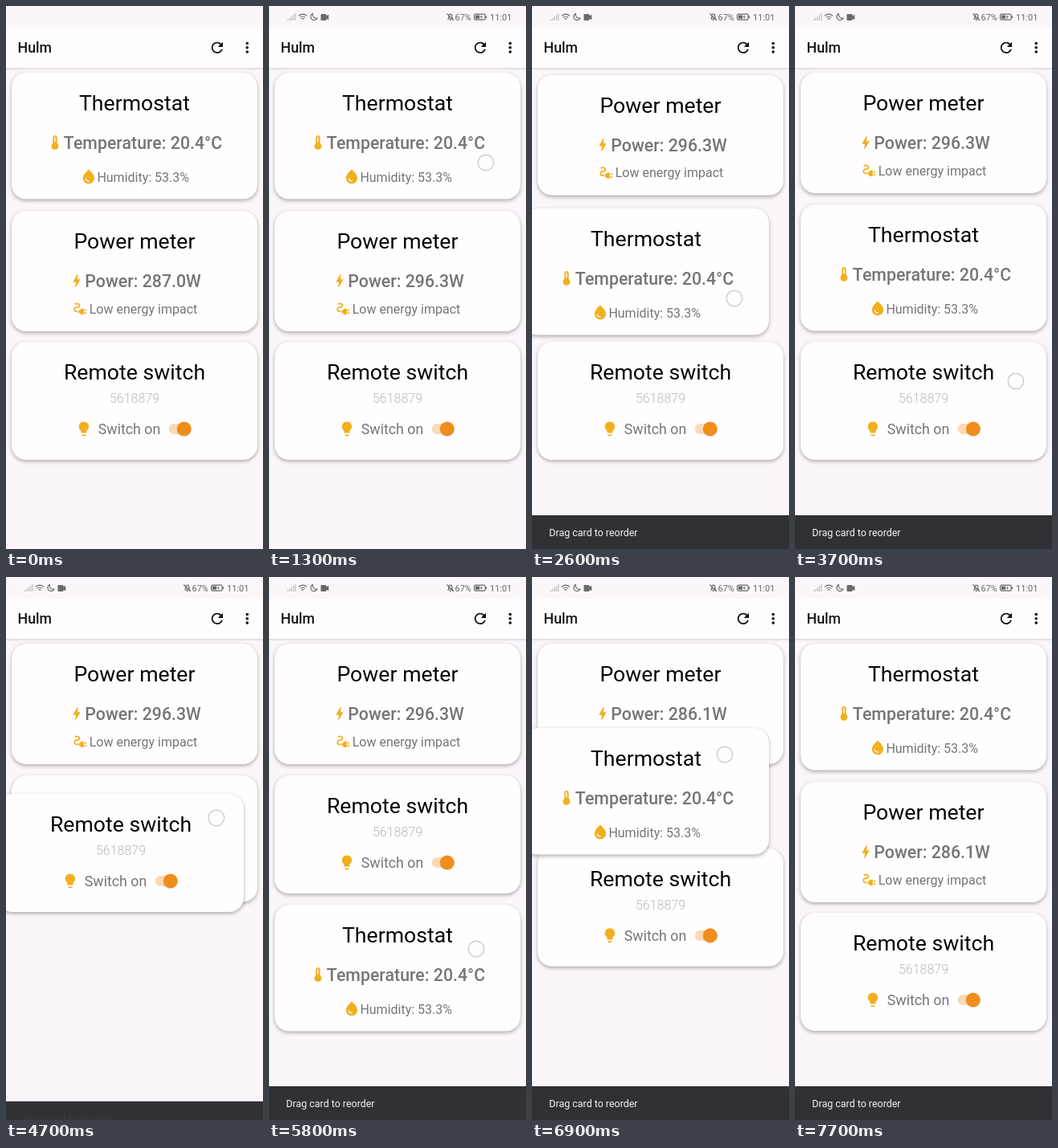
An HTML page that plays this animation: 320x676 px, repeating every 8000 ms.

```html
<!DOCTYPE html>
<html lang="en">
<head>
<meta charset="utf-8">
<title>Card reordering</title>
<style>
html, body { margin: 0; width: 100%; height: 100%; overflow: hidden; background: #faf6f9; }
svg { display: block; width: 100%; height: 100%; }
text { font-family: Roboto, "Noto Sans", sans-serif; }
.mid { text-anchor: middle; }
.title { font-size: 26.67px; fill: #050505; }
.value { font-size: 21.33px; font-weight: 500; fill: #757578; }
.note { font-size: 16px; fill: #757578; }
.code { font-size: 16px; font-weight: 300; fill: #b9b9bc; }
.label { font-size: 17.78px; fill: #757578; }
.status { font-size: 11px; fill: #69696c; }
.face { fill: #fffdfe; filter: drop-shadow(0 2px 2.5px rgba(0,0,0,.27)) drop-shadow(0 0 .7px rgba(0,0,0,.16)); }
.icon { fill: #f2af1d; }
</style>
</head>
<body>
<svg viewBox="0 0 320 676" preserveAspectRatio="none">
  <defs>
    <linearGradient id="under" x2="0" y2="1">
      <stop stop-color="#d9d6d9"/><stop offset="1" stop-color="#faf6f9"/>
    </linearGradient>
  </defs>
  <rect width="320" height="676" fill="#faf6f9"/>
  <rect y="77" width="320" height="3" fill="url(#under)"/>
  <rect y="27" width="320" height="50" fill="#fefcfe"/>

  <g id="status" fill="#69696c">
    <path d="M23 18v-2h1.3v2zm2.3 0v-3.5h1.3V18zm2.3 0v-5.2h1.3V18zm2.3 0v-7h1.3v7zm2.3 0V9h1.3v9z" fill="#c3c2c5"/>
    <g fill="none" stroke="#69696c" stroke-width="1.2">
      <path d="M37 12.3q5-4.4 10 0M38.8 14.4q3.2-2.8 6.4 0M40.6 16.3q1.4-1.2 2.8 0"/>
      <path d="M54.3 9.6a4.2 4.2 0 1 0 5.6 5.6a4.8 4.8 0 0 1-5.6-5.6z"/>
      <path d="M223 16h5.6l-.8-1.4v-2.4a2 2 0 0 0-4 0v2.4zM221.3 9.4l8.6 8.8M225 17.7h1.6"/>
      <rect x="255.6" y="10.2" width="13.6" height="7" rx="1.6"/>
    </g>
    <path d="M65.5 10h5q1 0 1 1v1.3l2.8-1.6v6.6l-2.8-1.6V17q0 1-1 1h-5q-1 0-1-1v-6q0-1 1-1z"/>
    <path d="M257 11.6h5.2v4.2H257zM269.8 12.3h1.3v2.8h-1.3zM264.8 11l-2.2 3h1.6l-.5 2.4 2.3-3.1h-1.6z"/>
    <text class="status" x="231.5" y="17.9">67%</text>
    <text class="status" x="275" y="17.9">11:01</text>
  </g>

  <text x="14.5" y="58.2" font-size="17.78" font-weight="500" fill="#161617">Hulm</text>
  <path transform="translate(252.3 41.2) scale(.889)" fill="#111" d="M17.65 6.35C16.2 4.9 14.21 4 12 4c-4.42 0-7.99 3.58-7.99 8s3.57 8 7.99 8c3.73 0 6.84-2.55 7.73-6h-2.08c-.82 2.33-3.04 4-5.65 4-3.31 0-6-2.69-6-6s2.69-6 6-6c1.66 0 3.14.69 4.22 1.78L13 11h7V4l-2.35 2.35z"/>
  <g fill="#111"><circle cx="300.3" cy="46.5" r="1.8"/><circle cx="300.3" cy="51.8" r="1.8"/><circle cx="300.3" cy="57.1" r="1.8"/></g>

  <g id="cards">
    <g id="thermo">
      <rect class="face" width="306" height="157.5" rx="18"/>
      <text class="title mid" x="153" y="47">Thermostat</text>
      <path class="icon" transform="translate(43.3 76.3) scale(.889)" d="M15 13V5c0-1.66-1.34-3-3-3S9 3.34 9 5v8c-1.21.91-2 2.37-2 4 0 2.76 2.24 5 5 5s5-2.24 5-5c0-1.63-.79-3.09-2-4zm-4-8c0-.55.45-1 1-1s1 .45 1 1h-1v1h1v2h-1v1h1v2h-2V5z"/>
      <text class="value mid" x="163.5" y="95">Temperature: 20.4°C</text>
      <path class="icon" transform="translate(85.3 118.8) scale(.889)" d="M12 2c-5.33 4.55-8 8.48-8 11.8 0 4.98 3.8 8.2 8 8.2s8-3.22 8-8.2c0-3.32-2.67-7.25-8-11.8zm-4.17 12c.37 0 .67.26.74.62.41 2.22 2.28 2.98 3.64 2.87.43-.02.79.32.79.75 0 .4-.32.73-.72.75-2.13.13-4.62-1.09-5.19-4.12-.08-.45.28-.87.74-.87z"/>
      <text class="note mid" x="163.7" y="136">Humidity: 53.3%</text>
    </g>
    <g id="power">
      <rect class="face" width="306" height="150" rx="18"/>
      <text class="title mid" x="153" y="47">Power meter</text>
      <path class="icon" transform="translate(70.3 76.3) scale(.889)" d="M11 21h-1l1-7H7.5c-.58 0-.57-.32-.38-.66l.07-.12C8.48 10.94 10.42 7.54 13 3h1l-1 7h3.5c.49 0 .56.33.47.51l-.07.15C12.96 17.55 11 21 11 21z"/>
      <text class="value mid" id="watts" x="163.6" y="95"></text>
      <path class="icon" transform="translate(74.7 111.2) scale(.889)" d="M21 14c0-.55-.45-1-1-1h-2v2h2c.55 0 1-.45 1-1zm-1 3h-2v2h2c.55 0 1-.45 1-1s-.45-1-1-1zm-8-3h-2v4h2c0 1.1.9 2 2 2h3v-8h-3c-1.1 0-2 .9-2 2zM5 13c0-1.1.9-2 2-2h1.5c1.93 0 3.5-1.57 3.5-3.5S10.43 4 8.5 4H5c-.55 0-1 .45-1 1s.45 1 1 1h3.5c.83 0 1.5.67 1.5 1.5S9.33 9 8.5 9H7c-2.21 0-4 1.79-4 4s1.79 4 4 4h2v-2H7c-1.1 0-2-.9-2-2z"/>
      <text class="note mid" x="164" y="127.7">Low energy impact</text>
    </g>
    <g id="remote">
      <rect class="face" width="306" height="147" rx="18"/>
      <text class="title mid" x="153" y="46.7">Remote switch</text>
      <text class="code mid" x="153" y="75.7">5618879</text>
      <path class="icon" transform="translate(79.3 97.6) scale(.889)" d="M9 21c0 .5.4 1 1 1h4c.6 0 1-.5 1-1v-1H9v1zm3-19C8.1 2 5 5.1 5 9c0 2.4 1.2 4.5 3 5.7V17c0 .5.4 1 1 1h6c.6 0 1-.5 1-1v-2.3c1.8-1.3 3-3.4 3-5.7 0-3.9-3.1-7-7-7z"/>
      <text class="label mid" x="146.5" y="115.2">Switch on</text>
      <rect x="195.7" y="102" width="28" height="13" rx="6.5" fill="#fad9b4"/>
      <circle cx="214.8" cy="109.3" r="9" fill="#000" opacity=".12"/>
      <circle cx="214.8" cy="108.4" r="8.9" fill="#ef8e1b"/>
    </g>
  </g>

  <g id="snack">
    <rect y="634" width="320" height="43" fill="#313034"/>
    <text id="snackText" x="21.3" y="660.2" font-size="12.44" fill="#f4f3f5">Drag card to reorder</text>
  </g>
  <circle id="touch" r="9.8" fill="#fff" fill-opacity=".55" stroke="#cdccd8" stroke-width="1.4"/>
</svg>
<script>
const LOOP = 8000, STEP = 100, ANIM = 250, LEAD = 50;
const el = id => document.getElementById(id);
const clamp = v => Math.max(0, Math.min(1, v));
const mix = (a, b, p) => a + (b - a) * p;
const ease = p => .5 - Math.cos(clamp(p) * Math.PI) / 2;

// cubic-bezier(.4, 0, .2, 1)
function glide(x) {
  let lo = 0, hi = 1;
  x = clamp(x);
  for (let i = 0; i < 20; i++) {
    const s = (lo + hi) / 2, r = 1 - s;
    if (1.2 * r * r * s + .6 * r * s * s + s ** 3 < x) lo = s; else hi = s;
  }
  return 3 * (1 - lo) * lo * lo + lo ** 3;
}

const start = { thermo: 83, power: 255, remote: 418 };

// keys: time, dx, dy
const drags = [
  { card: 'thermo', press: 1100, grab: [270, 195], from: 83, to: 247, drop: 2950, keys: [
    [1650, 0, 0], [1900, -1, 3], [2000, -3, 7.5], [2050, -6, 22], [2150, -10, 62],
    [2250, -14, 115], [2350, -17, 155], [2450, -18, 166], [2600, -18, 169], [2750, -18, 169], [2800, -18, 168]] },
  { card: 'remote', press: 3700, grab: [275, 467], from: 418, to: 247, drop: 4900, keys: [
    [4250, 0, 0], [4400, -4, -16], [4550, -14, -82], [4700, -17, -148], [4750, -13, -167], [4850, -13, -177]] },
  { card: 'thermo', press: 5600, grab: [258, 463], from: 408, to: 83, drop: 7400, keys: [
    [6100, 0, 0], [6400, -1, -5], [6500, -3, -17.5], [6550, -8, -48], [6700, -14, -128],
    [6800, -17, -176], [6900, -18, -220], [7000, -18, -264], [7100, -17, -304], [7200, -16, -330]] }
];

const shifts = [
  { card: 'power', at: 2370, to: 83 },
  { card: 'thermo', at: 4770, to: 408 },
  { card: 'remote', at: 6770, to: 418 },
  { card: 'power', at: 7160, to: 255 }
];

const snacks = [[1550, 1], [4357, 0], [4607, 1], [6220, 0], [6470, 1]];

function offset(keys, t) {
  if (t <= keys[0][0]) return [0, 0];
  for (let i = 1; i < keys.length; i++) {
    const [t0, x0, y0] = keys[i - 1], [t1, x1, y1] = keys[i];
    if (t < t1) {
      const p = (t - t0) / (t1 - t0);
      return [mix(x0, x1, p), mix(y0, y1, p)];
    }
  }
  return keys[keys.length - 1].slice(1);
}

function place(id, t) {
  let x = 0, y = start[id];
  const events = [
    ...shifts.map(s => ({ ...s, when: s.at })),
    ...drags.map(d => ({ ...d, when: d.press }))
  ].filter(e => e.card === id && e.when <= t).sort((a, b) => a.when - b.when);
  for (const e of events) {
    if (e.keys) {
      const [dx, dy] = offset(e.keys, Math.min(t, e.drop));
      const back = ease((t - e.drop) / ANIM);
      x = mix(dx, 0, back);
      y = mix(e.from + dy, e.to, back);
    } else {
      y = mix(y, e.to, ease((t - e.at) / ANIM));
    }
  }
  el(id).setAttribute('transform', `translate(${7 + x} ${y})`);
}

function drawSnack(t) {
  let shown = 0, alpha = 0;
  for (const [at, open] of snacks) {
    if (t < at) break;
    const p = glide((t - at) / ANIM);
    shown = open ? p : 1 - p;
    alpha = open ? glide((t - at - 70) / 180) : 1 - glide((t - at) / 180);
  }
  el('snack').setAttribute('transform', `translate(0 ${42 * (1 - shown)})`);
  el('snack').style.display = shown > 0 ? '' : 'none';
  el('snackText').setAttribute('opacity', alpha);
}

function draw(t) {
  el('status').style.display = t < 200 ? 'none' : '';
  el('watts').textContent = `Power: ${t < 700 ? '287.0' : t < 6100 ? '296.3' : '286.1'}W`;
  Object.keys(start).forEach(id => place(id, t));

  const held = drags.find(d => t >= d.press && t < d.drop + ANIM);
  if (held && el('cards').lastElementChild !== el(held.card)) el('cards').append(el(held.card));

  const touching = held && t < held.drop;
  el('touch').style.display = touching ? '' : 'none';
  if (touching) {
    const [dx, dy] = offset(held.keys, t + LEAD);
    el('touch').setAttribute('cx', held.grab[0] + dx);
    el('touch').setAttribute('cy', held.grab[1] + dy);
  }
  drawSnack(t);
}

const begin = performance.now();
function tick() {
  const t = (performance.now() - begin) % LOOP;
  draw(Math.floor(t / STEP) * STEP);
  requestAnimationFrame(tick);
}
tick();
</script>
</body>
</html>
```
